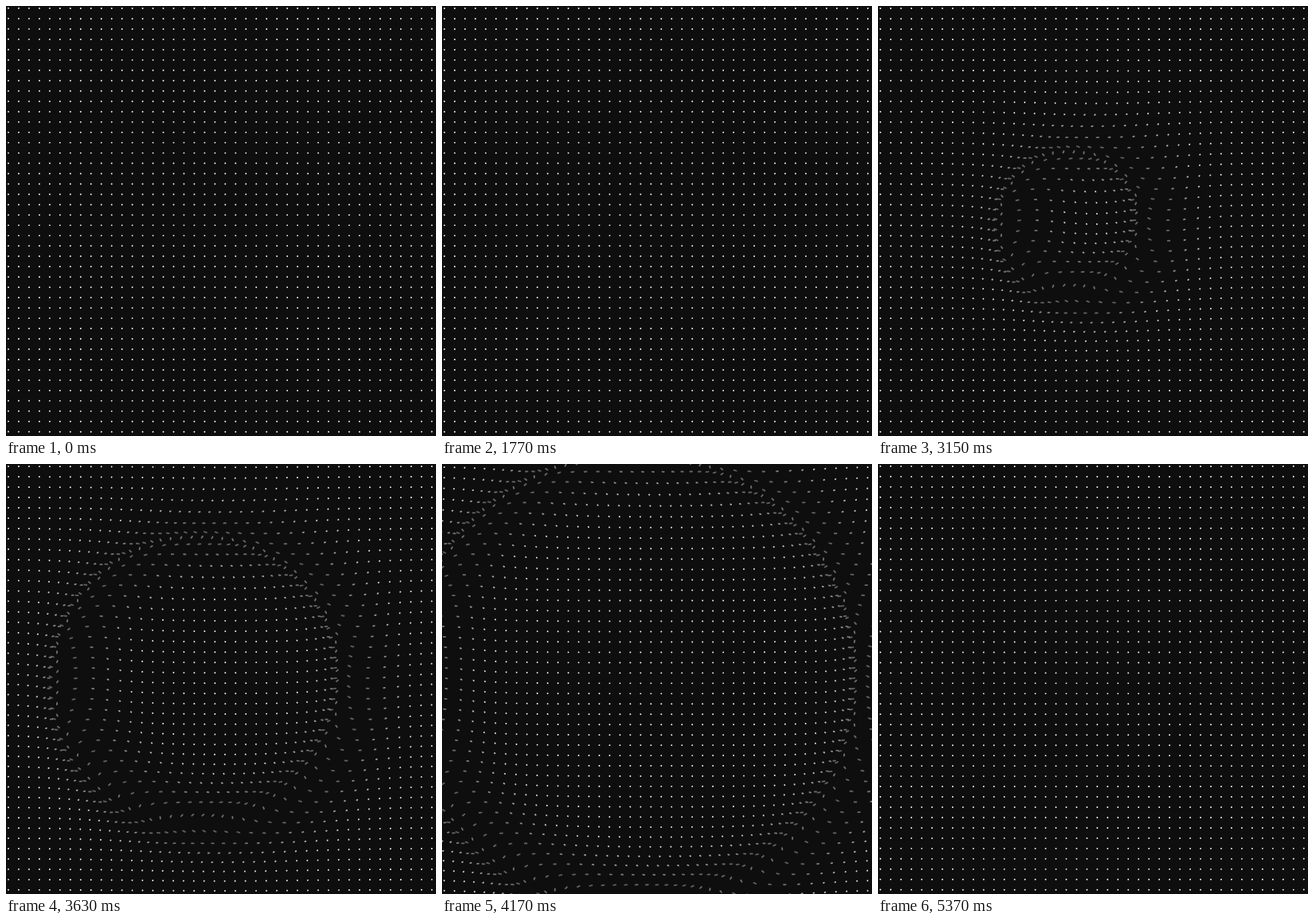
Animation, 540 px wide and 540 px high, one loop 5400 ms. Source, as an HTML page with a canvas:

```html
<!DOCTYPE html>
<html lang="en">
<head>
<meta charset="utf-8">
<title>Dot ripple</title>
<style>
  html, body { margin: 0; width: 100%; height: 100%; overflow: hidden; background: #0e0e0e; }
  canvas { display: block; }
</style>
</head>
<body>
<canvas id="stage" width="540" height="540"></canvas>
<script>
const ctx = document.getElementById('stage').getContext('2d');
const SIZE = 540, LOOP = 5400, STEP = 30;
const COUNT = 42, MARGIN = 3, ORIGIN = 3, PITCH = 12.97, DOT = 1.9;
const CENTER_PEAK = 2690;   // when the middle is farthest out
const SPEED = 0.191;        // wavefront, px per ms
const ORBIT_TIME = 2250, RADIUS_X = 15, RADIUS_Y = 6.5;
const SHUTTER = 18;

// The grid runs past the stage, since the wave pulls outer dots into view.
const dots = [];
for (let row = -MARGIN; row < COUNT + MARGIN; row++) {
  for (let col = -MARGIN; col < COUNT + MARGIN; col++) {
    const x = ORIGIN + col * PITCH, y = ORIGIN + row * PITCH;
    const distance = Math.hypot(x - SIZE / 2, y - SIZE / 2);
    dots.push({ x, y, peak: CENTER_PEAK + distance / SPEED });
  }
}

const mod = (a, n) => ((a % n) + n) % n;

function easeInOutExpo(u) {
  if (u <= 0) return 0;
  if (u >= 1) return 1;
  return u < 0.5 ? 2 ** (20 * u - 10) / 2 : 1 - 2 ** (10 - 20 * u) / 2;
}

// Each dot makes one turn round a flat ellipse as the wave passes.
function position(dot, time) {
  const sincePeak = mod(time - dot.peak + LOOP / 2, LOOP) - LOOP / 2;
  const angle = 2 * Math.PI * easeInOutExpo(0.5 + sincePeak / ORBIT_TIME);
  return [
    dot.x - RADIUS_X * (1 - Math.cos(angle)),
    dot.y + RADIUS_Y * Math.sin(angle)
  ];
}

function draw(time) {
  ctx.globalAlpha = 1;
  ctx.fillStyle = '#0e0e0e';
  ctx.fillRect(0, 0, SIZE, SIZE);
  ctx.fillStyle = ctx.strokeStyle = '#fff';
  ctx.lineWidth = DOT;
  ctx.lineCap = 'round';
  for (const dot of dots) {
    const [x0, y0] = position(dot, time - SHUTTER / 2);
    const [x1, y1] = position(dot, time + SHUTTER / 2);
    const smear = Math.hypot(x1 - x0, y1 - y0);
    // Spread the light of one dot over the area of its streak.
    ctx.globalAlpha = 1 / (1 + 4 * smear / (Math.PI * DOT));
    ctx.beginPath();
    if (smear < 0.01) {
      ctx.arc(x0, y0, DOT / 2, 0, 2 * Math.PI);
      ctx.fill();
    } else {
      ctx.moveTo(x0, y0);
      ctx.lineTo(x1, y1);
      ctx.stroke();
    }
  }
}

const start = performance.now();
function tick() {
  const time = (performance.now() - start) % LOOP;
  draw(Math.floor(time / STEP) * STEP);
  requestAnimationFrame(tick);
}
tick();
</script>
</body>
</html>
```
